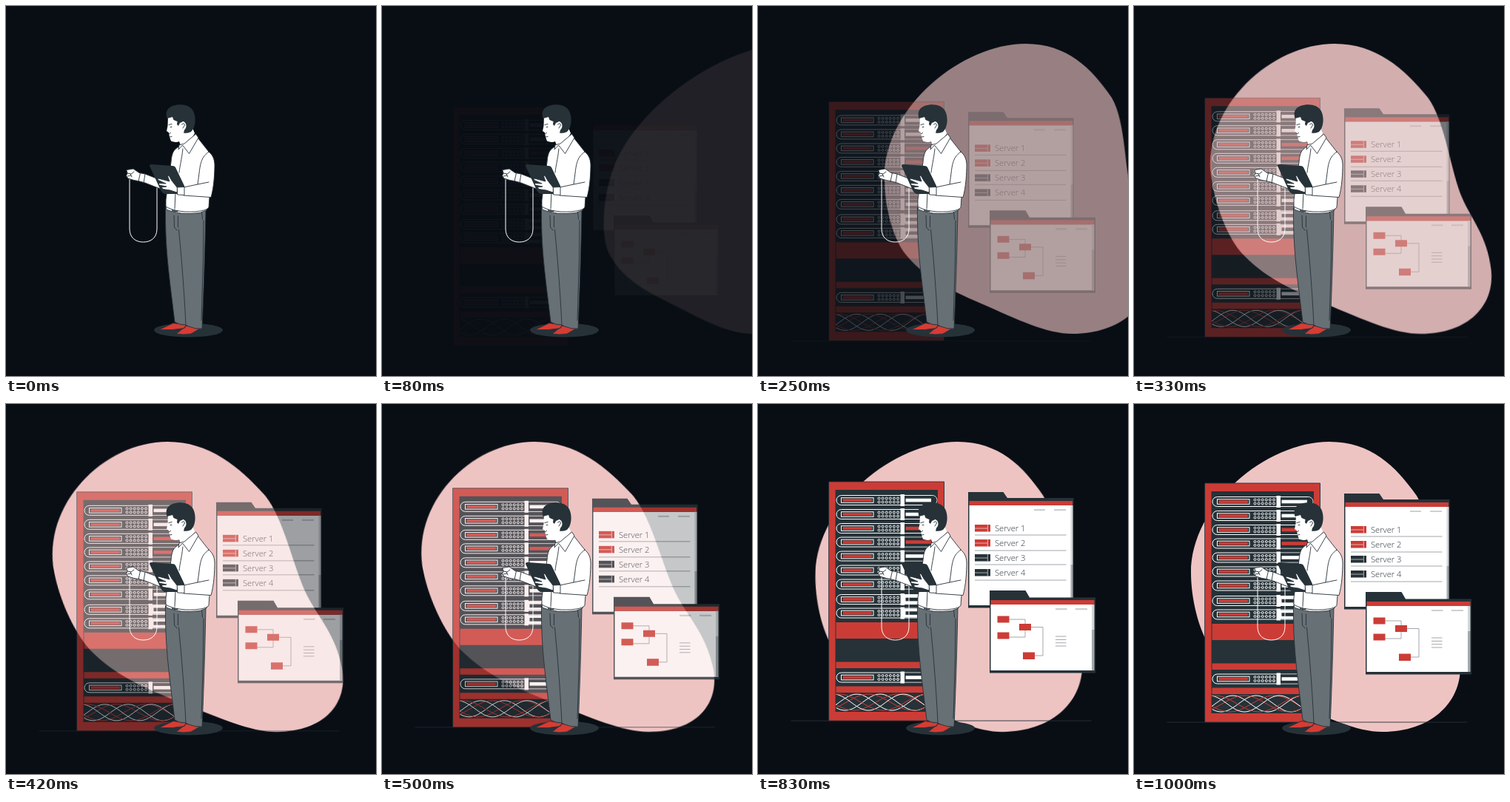
Animation of 500x500 px, one loop 1.04 s. Source, as an HTML page:

```html
<!DOCTYPE html>
<html lang="en">
<head>
<meta charset="utf-8">
<title>Server room</title>
<style>
  html, body { margin: 0; height: 100%; overflow: hidden; background: #090e15; }
  svg { display: block; width: 100vw; height: 100vh; }
  text { font: 300 11.2px "Open Sans", "Noto Sans", sans-serif; fill: #263238; }
  .ink { stroke: #263238; stroke-width: .9; stroke-linejoin: round; stroke-linecap: round; }
  .red { fill: #cc3c36; }
  .dark { fill: #263238; }
  .white { fill: #fff; }
  .line { fill: none; }
  .wire { fill: none; stroke: #fff; stroke-width: 1; }
  .grey { fill: none; stroke: #8b9195; stroke-width: .8; }
  .dash { fill: none; stroke: #cdcfd0; stroke-width: 2.2; }
  #blob, #scene { animation: 1s cubic-bezier(.36, -.01, .5, 1.38) both paused; }
  #blob { animation-name: sweep; transform-origin: 250px 250px; }
  #scene { animation-name: rise; }
  @keyframes rise {
    from { opacity: 0; transform: translateY(30px); }
    to { opacity: 1; transform: translateY(0); }
  }
  @keyframes sweep {
    from { opacity: 0; transform: translateX(250px) skewX(-20deg); }
    60% { opacity: 1; transform: translateX(0) skewX(10deg); }
    80% { opacity: 1; transform: translateX(0) skewX(-2deg); }
    to { opacity: 1; transform: translateX(0) skewX(0); }
  }
</style>
</head>
<body>
<svg viewBox="0 0 500 500">
  <path id="blob" fill="#eec4c3" d="M264 51C320 51 354 84 382 124C402 157 401 222 413 260C422 288 441 312 441 356C441 405 400 443 336 443C300 443 262 424 211 402C165 382 132 366 105 332C87 306 77 262 77 228C77 136 178 51 264 51Z"/>

  <g id="scene">
    <path class="ink" d="M45 430H450"/>
    <g id="rack">
      <path class="red ink" d="M96 107H251.500V430H96Z"/>
      <path class="dark" d="M104.500 118H243V418H104.500Z"/>
      <path class="red" d="M105.500 297H243V319H105.500ZM105.500 350.500H243V359H105.500ZM105.500 383.500H243V392H105.500Z"/>
    </g>

    <g id="list">
      <path class="dark" d="M284 121H331.500L337 129H426.500V277.500H284Z"/>
      <path class="white" d="M285.500 139H425V274H285.500Z"/>
      <path class="red" d="M285.500 133H425V139H285.500Z"/>
      <path fill="#d5d8d9" d="M422.500 139H425.500V219H422.500Z"/>
      <path fill="#a5abad" d="M422.500 219H425.500V274H422.500Z"/>
      <path class="dash" d="M373 145H388M400 145H416"/>
    </g>

    <g>
      <path class="dark" d="M313 254H361.500L367 263.500H456V365.500H313Z"/>
      <path class="white" d="M314.500 273H454V362H314.500Z"/>
      <path class="red" d="M314.500 267H454.500V273H314.500Z"/>
      <path fill="#d5d8d9" d="M451 273H454.500V307H451Z"/>
      <path fill="#a5abad" d="M451 307H454.500V362H451Z"/>
      <path class="dash" d="M402 279H417.500M429 279H445"/>
      <path class="grey" d="M339 293H361V317H339M369 303.500H385V342H374M402 316H416.500M402 320.400H416.500M402 324.700H416.500M402 329H416.500"/>
      <path class="red" d="M323.500 288.500h16v9h-16zM323.500 310.500h16v9h-16zM353 299h16v9h-16zM358 337.500h16v9.500h-16z"/>
    </g>
  </g>

  <ellipse class="dark" cx="246.500" cy="438" rx="46.500" ry="9.500"/>
  <path class="wire" d="M167 232V301C167 313 175 319 185.500 319S204 313 204 301V244"/>

  <g id="man">
    <path class="ink" fill="#d63c34" d="M207 437.500L226 428.500L244 431L241 435.500L225 437.500ZM230 443L244 432L262 436L250 443Q240 445 230 443Z"/>
    <path class="ink" fill="#677075" d="M215.500 273C215 320 219 350 222 378L228 427Q234 431 243 431L247 433Q256 437 265 436C267 390 269 330 270 274Z"/>
    <path class="line ink" d="M227 283L227.500 299L231 303M232.500 284V299M233.500 302C236 330 240 370 243 431M264.500 278L265.500 288M267 290L266.500 340L264 425"/>
    <path class="white ink" d="M216 269L216.500 275Q235 283 262 279.500L271 276V270ZM225 272L232 273V278L225 277Z"/>
    <path class="white ink" d="M163 221.500L172 220L180 225.500L188 227L206 234L211 248L188 239L179 236.500L173 235.500L165 233L162.500 229.500L164 226Z"/>
    <path class="line ink" d="M181.500 225.500L179 237M188 227L186 239M164 226L169 227L173 224M164 230L169 229M168 227L170 231"/>
    <path class="white ink" d="M234 190C226 194 224 199 223 211L216 262V271C225 277 245 280 263 277Q273 275 274 272L275 258L274 197L259 178L247 184Z"/>
    <path class="line ink" d="M239 193C237 210 235 215 234 225M229 252L228 274"/>

    <path class="white" d="M219 148L218.500 162L217 169L220 171L221 177L223 182.500Q229 185 234 183L237 191L248 184L255 172L246 150Z"/>
    <path class="dark" d="M217.500 152C215 143 218 138 225 135C236 131.500 248 133 253 142C257.500 151 256 165 250 170Q246 172.500 240 171.500L242 164L240 156L235 158L233 162L231 160L231.500 156L226.500 154L225 150Z"/>
    <ellipse class="white" cx="239.500" cy="162" rx="4" ry="5.800"/>
    <path class="line ink" d="M237.500 160Q241 157 241.500 161L239 165M220 160.500L224 159.500M222 163.500H224M220.500 172.500L222.500 171.500M221 177L224 176.500"/>
    <path class="white ink" d="M234 188L233 194L238.500 188L247.500 199.500L260 178L256.500 173L241 186Z"/>

    <path class="dark" d="M194 216Q194 213.500 197 214L225 216Q228 216 229 218L241 243L241.500 249L233 254L214 254Q211 253 209 249Z"/>
    <path class="white ink" d="M274 197C266 203 263 208 261 226L259 241L240 245V256L277 258.500C281 245 282 226 282 214C281.500 206 279 201 274 197M259 241L274 238"/>
    <path class="white ink" d="M231 245L241 244.500V255.500L232 255Z"/>
    <path class="white ink" d="M231 245L224 236L220 229L218.500 230L221 237L206 233L205 235L216 240L206 239.500L207 242L217 244L210 245L212 247.500L222 249L231 252Z"/>
  </g>
</svg>
<script>
const RED = '#cc3c36', DARK = '#263238', WHITE = '#fff';
const rack = document.getElementById('rack');
const list = document.getElementById('list');
const add = (parent, markup) => parent.insertAdjacentHTML('beforeend', markup);

function unit(y, bar, panel = DARK) {
  let dots = '';
  for (let i = 0; i < 12; i++)
    dots += `<circle class="wire" cx="${163.5 + i % 6 * 5.1}" cy="${y + (i < 6 ? -2.5 : 2.5)}" r="1.5"/>`;
  add(rack, `
    <rect class="wire" x="106" y="${y - 6.5}" width="136" height="13" rx="6.5"/>
    <path fill="${panel}" d="M198 ${y - 6}H235.500a6 6 0 0 1 0 12H198Z"/>
    <rect class="wire" x="112.5" y="${y - 3.3}" width="43.5" height="6.6"/>
    <rect class="red" x="114.5" y="${y - 1.9}" width="39.5" height="3.8"/>
    ${dots}
    <rect class="white" x="192.5" y="${y - 8}" width="5.5" height="16"/>
    <rect x="199.5" y="${y - 2.3}" width="34.5" height="4.6" fill="${bar}"/>`);
}
[132, 151, 170, 188.5, 207.5, 226.5, 245.5].forEach((y, i) => unit(y, i === 2 || i === 3 ? RED : WHITE));
[266, 284.5].forEach(y => unit(y, DARK, WHITE));
unit(371.5, WHITE);

// Braided cables at the foot of the rack
for (let k = 0; k < 6; k++) {
  const red = k % 2;
  let d = '';
  for (let x = 105; x <= 243; x += 3) {
    const y = 405 + 11 * Math.sin(x / (red ? 19 : 15) + k * Math.PI / 3);
    d += `${d ? 'L' : 'M'}${x} ${y.toFixed(1)}`;
  }
  add(rack, `<path class="wire" d="${d}" style="stroke:${red ? RED : WHITE}"/>`);
}

for (let i = 0; i < 4; i++) {
  const y = 170 + i * 20;
  add(list, `
    <rect class="${i < 2 ? 'red' : 'dark'}" x="293" y="${y - 5}" width="21" height="9.5"/>
    <path d="M293 ${y}H310M310.300 ${y - 5}v9.500" stroke="#fff" stroke-width=".6"/>
    <text x="320" y="${y + 3.8}">Server ${i + 1}</text>
    <path class="grey" d="M293 ${y + 9 + i % 2}H416.500"/>`);
}

// Step the entrance at 24 pictures a second
const LOOP = 1040, STEP = 1000 / 24;
const moves = document.getAnimations();
function draw() {
  const step = Math.floor((performance.now() % LOOP + 5) / STEP);
  const time = step < 2 ? 0 : step * STEP + 15;
  for (const move of moves) move.currentTime = time;
  requestAnimationFrame(draw);
}
draw();
</script>
</body>
</html>
```
